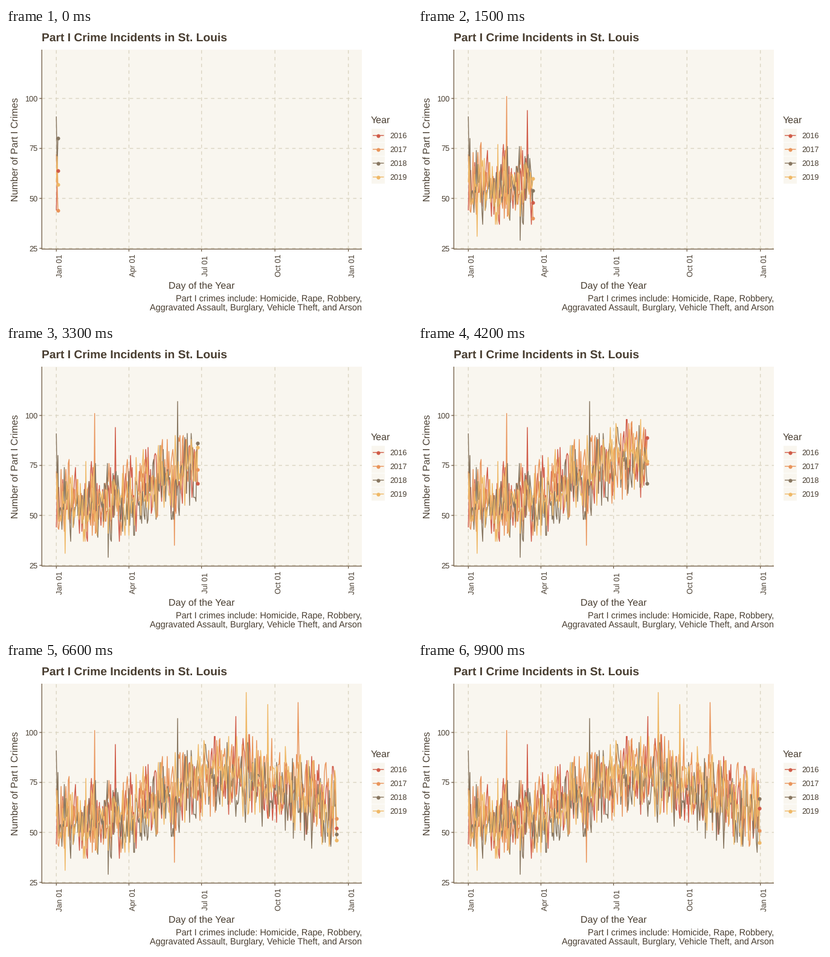
A matplotlib script that plays this animation: 672 by 480 pixels, repeating every 10000 ms.

```python
import matplotlib.pyplot as plt
import numpy as np
from matplotlib.animation import FuncAnimation
from matplotlib.patches import Rectangle

W, H, DPI = 672, 480, 96
FRAMES, REVEAL, LAST_DAY = 100, 69, 365
PX = 72 / DPI  # points per pixel

TEXT, AXIS, GRID, PANEL = "#483d30", "#7a6751", "#dbd5c2", "#f9f6ef"
LEFT, RIGHT, TOP, BOTTOM = 59.3, 589, 36, 367.3
DAYS = np.arange(LAST_DAY + 1)

# Per year: colour, drift over the year, and its most striking days
YEARS = {
    2016: ("#d05b48", 1, {2: 64, 74: 94, 79: 37, 225: 108, 365: 62}),
    2017: ("#e9945a", 2, {2: 44, 48: 101, 148: 35, 303: 115, 365: 51}),
    2018: ("#877660", -5, {0: 91, 2: 80, 65: 29, 152: 107, 365: 67}),
    2019: ("#efb866", 0, {2: 57, 11: 31, 238: 120, 265: 114, 365: 45}),
}

plt.rcParams["font.family"] = "Liberation Sans"
plt.rcParams["text.hinting"] = "no_hinting"
plt.rcParams["path.snap"] = False


def x_of(day):
    return 83.3 + 1.3207 * day


def y_of(count):
    return 117 + (100 - count) * 3.32


def daily_counts(year, drift, striking):
    """Yearly wave, low in February and high in August, plus daily noise."""
    noise = np.random.default_rng(year).normal(0, 9.5, DAYS.size)
    noise[1:] += 0.3 * noise[:-1]
    wave = 67.5 - 11 * np.cos(2 * np.pi * (DAYS - 42) / 365)
    counts = np.round(wave + drift * DAYS / LAST_DAY + noise.clip(-20, 20))
    for day, count in striking.items():
        counts[day] = count
    return counts


fig = plt.figure(figsize=(W / DPI, H / DPI), dpi=DPI, facecolor="white")
ax = fig.add_axes([0, 0, 1, 1])
ax.set_xlim(0, W)
ax.set_ylim(H, 0)
ax.axis("off")


def label(x, y, text, size, **kw):
    ax.text(x, y, text, fontsize=size * PX, color=TEXT, va="baseline", **kw)


def upright(x, y, text, size):
    label(x, y, text, size, ha="center", rotation=90, rotation_mode="anchor")


def stroke(xs, ys, color, **kw):
    return ax.plot(xs, ys, color=color, lw=1.4 * PX,
                   solid_capstyle="butt", **kw)[0]


def dot(x, y, color, z):
    return ax.plot([x], [y], "o", color=color, ms=6.2 * PX, mew=0, zorder=z)[0]


def box(x, y, w, h):
    ax.add_patch(Rectangle((x, y), w, h, fc=PANEL, ec="none", zorder=0))


def draw_chart():
    box(LEFT, TOP, RIGHT - LEFT, BOTTOM - TOP)
    dashes = dict(dashes=(4, 4), dash_capstyle="butt", zorder=1)
    for count in range(25, 101, 25):
        y = y_of(count)
        stroke([LEFT, RIGHT], [y, y], GRID, **dashes)
        stroke([LEFT - 4, LEFT], [y, y], AXIS)
        label(52.5, y + 4.6, str(count), 12.8, ha="right")
    ticks = zip((0, 91, 182, 274, 366), ("Jan", "Apr", "Jul", "Oct", "Jan"))
    for day, month in ticks:
        x = x_of(day)
        stroke([x, x], [BOTTOM, TOP], GRID, **dashes)
        stroke([x, x], [BOTTOM, BOTTOM + 4], AXIS)
        upright(x + 10, 394.5, month + " 01", 12.8)
    stroke([LEFT, LEFT, RIGHT], [TOP, BOTTOM, BOTTOM], AXIS, zorder=6,
           solid_joinstyle="miter")

    label(59, 22, "Part I Crime Incidents in St. Louis", 19.2, weight="bold")
    label(324, 433, "Day of the Year", 16, ha="center")
    upright(20, 202, "Number of Part I Crimes", 16)
    label(RIGHT, 454, "Part I crimes include: Homicide, Rape, Robbery,",
          14.5, ha="right")
    label(RIGHT, 469, "Aggravated Assault, Burglary, Vehicle Theft, and Arson",
          14.5, ha="right")


def draw_legend():
    label(604, 158, "Year", 16)
    for i, (year, (color, *_)) in enumerate(YEARS.items()):
        y = 178.5 + 23 * i
        box(605, y - 11, 22, 22)
        stroke([607, 625.5], [y, y], color)
        dot(616, y, color, 5)
        label(635, y + 4.6, str(year), 12.8)


draw_chart()
draw_legend()

xs = x_of(DAYS)
tracks = []
for i, (year, (color, drift, striking)) in enumerate(YEARS.items()):
    ys = y_of(daily_counts(year, drift, striking))
    line = stroke([], [], color, zorder=3 + i / 10, solid_joinstyle="round")
    tracks.append((ys, line, dot(0, 0, color, 4 + i / 10)))


def update(frame):
    day = min(LAST_DAY, int((frame + 0.5) * LAST_DAY / REVEAL))
    artists = []
    for ys, line, head in tracks:
        line.set_data(xs[:day + 1], ys[:day + 1])
        head.set_data([xs[day]], [ys[day]])
        artists += [line, head]
    return artists


anim = FuncAnimation(fig, update, frames=FRAMES, interval=100, repeat=True,
                     repeat_delay=0, blit=False)
plt.show()
```
